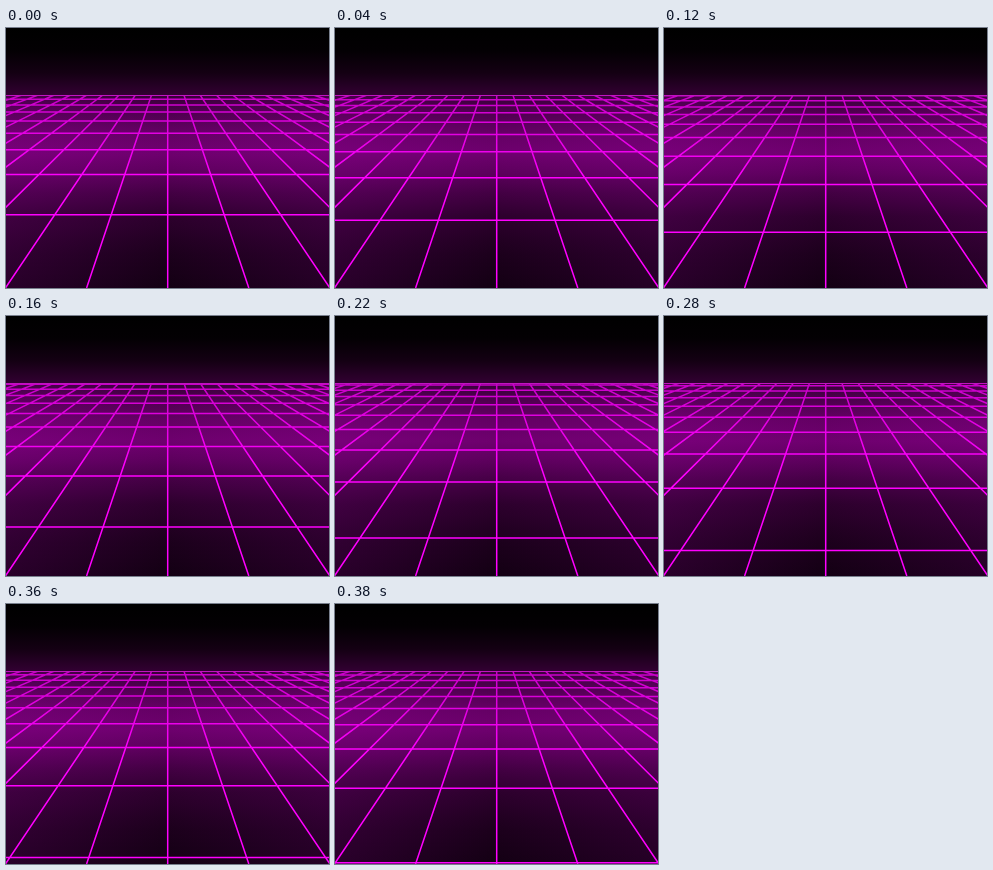
An HTML page with a canvas for the animation above (0.4 s loop, 323 by 260 pixels).

```html
<!DOCTYPE html>
<html lang="en">
<head>
<meta charset="utf-8">
<title>Neon grid</title>
<style>
  html, body { margin: 0; width: 100%; height: 100%; overflow: hidden; background: #000; }
  canvas { display: block; }
</style>
</head>
<body>
<canvas id="stage" width="323" height="260"></canvas>
<script>
const W = 323, H = 260, EDGE = 67;
const LOOP = 400, STEPS = 20;
const CENTER = 161.7, HORIZON = 18.9;
const SLOPE = 0.3365;                        // column spacing per pixel below the horizon
const NEAR = 1 / 167.9, ROW_DEPTH = 0.00188; // depth is 1 / (y - HORIZON)
const ctx = document.getElementById('stage').getContext('2d');

function gradient(x, y, stops) {
  const g = ctx.createLinearGradient(0, 0, x, y);
  for (const [at, color] of stops) g.addColorStop(at / (x + y), color);
  return g;
}

const sky = gradient(0, H, [[0, '#000'], [22, '#030003'], [45, '#140013'], [EDGE, '#320032']]);
const floor = gradient(0, H, [
  [EDGE, '#360036'], [82, '#4a004a'], [105, '#640064'], [125, '#6e006e'], [145, '#5c005c'],
  [165, '#430043'], [188, '#2d002d'], [225, '#1c001c'], [H, '#130013']
]);
const sides = gradient(W, 0, [
  [0, 'rgba(190,0,200,.13)'], [CENTER, 'rgba(190,0,200,0)'], [W, 'rgba(190,0,200,.1)']
]);
const neon = gradient(0, H, [[EDGE, '#c800c8'], [110, '#e600e6'], [150, '#f0f']]);

function line(x1, y1, x2, y2) {
  ctx.moveTo(x1, y1);
  ctx.lineTo(x2, y2);
}

function draw(now) {
  const phase = Math.floor(now % LOOP / LOOP * STEPS) / STEPS;
  ctx.fillStyle = sky;
  ctx.fillRect(0, 0, W, EDGE);
  for (const layer of [floor, sides]) {
    ctx.fillStyle = layer;
    ctx.fillRect(0, EDGE, W, H - EDGE);
  }

  ctx.save();
  ctx.beginPath();
  ctx.rect(0, EDGE, W, H - EDGE);
  ctx.clip();
  ctx.beginPath();
  for (let n = -10; n <= 10; n++) {
    const x = y => CENTER + n * SLOPE * (y - HORIZON);
    line(x(EDGE), EDGE, x(H), H);
  }
  for (let n = 0; n < 10; n++) {
    const y = HORIZON + 1 / (NEAR + ROW_DEPTH * (n - phase));
    line(0, y, W, y);
  }
  ctx.strokeStyle = neon;
  ctx.lineWidth = 1.5;
  ctx.stroke();
  ctx.restore();

  ctx.fillStyle = '#c014c0';
  ctx.fillRect(0, EDGE, W, 1);
  requestAnimationFrame(draw);
}
draw(0);
</script>
</body>
</html>
```
